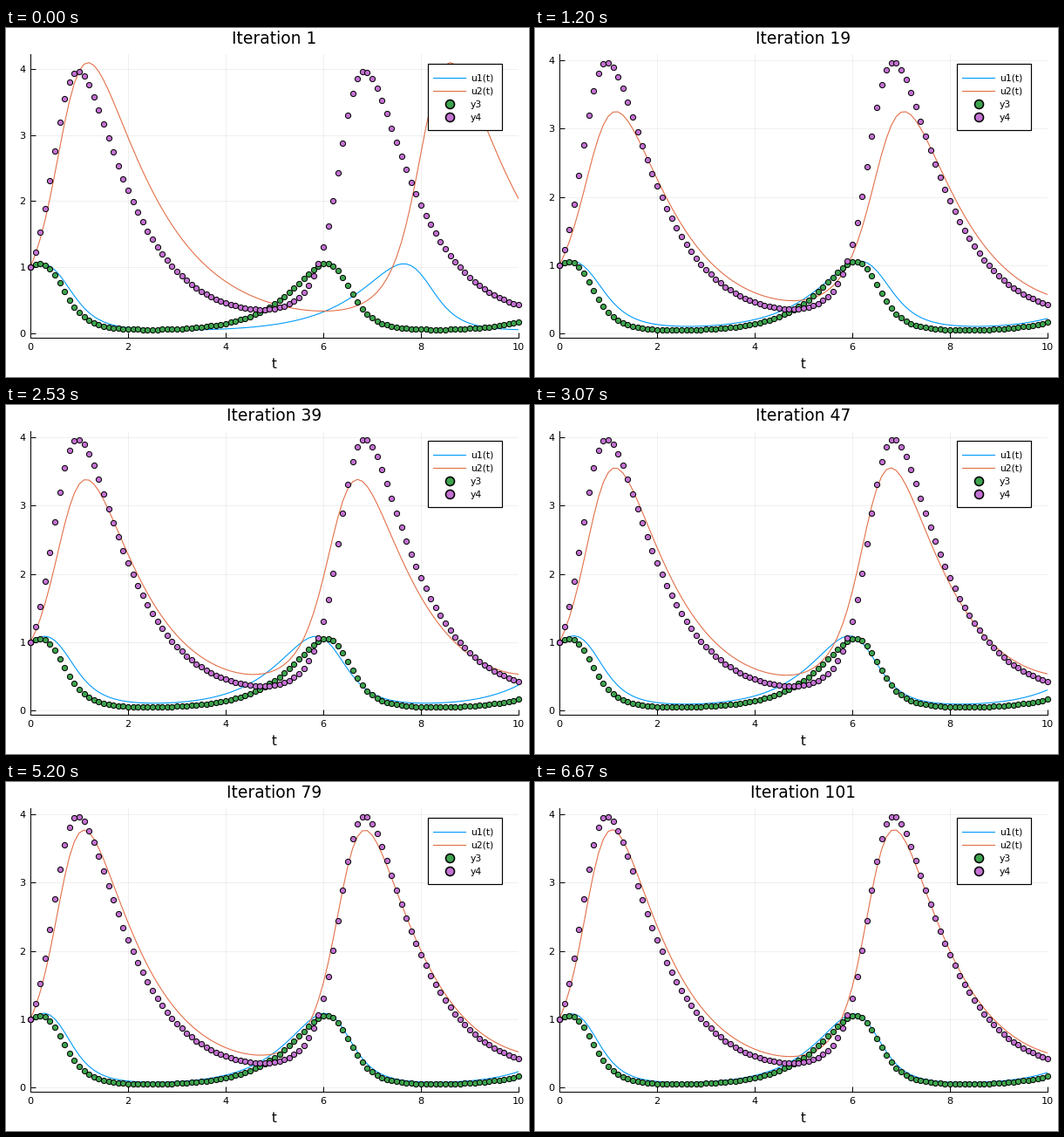
Recreate the animation shown at these times as a matplotlib script. Size 600 by 400 pixels, loop 6740 ms.

```python
import numpy as np
import matplotlib.pyplot as plt
from matplotlib.animation import FuncAnimation
from matplotlib.patches import Rectangle

W, H, DPI = 600, 400, 100
LOOP_MS, TICK_MS = 6740, 20
COUNT, RATE = 101, 15  # iterations, iterations per second
LEFT, RIGHT, TOP, BOTTOM = 28, 588, 30.4, 355.3
BLUE, ORANGE, GREEN, PURPLE = "#009afa", "#e36f47", "#3ea44e", "#c371d2"

T = np.linspace(0, 10, 101)
TRUE_PARAMS = (1.5, 1.0, 1.0, 3.0)

# Fitting progress: iteration, then prey growth, predation,
# predator decay and predator growth.
STAGES = np.array([
    (1, 1.200, 0.800, 0.800, 2.500),
    (19, 1.389, 0.959, 0.969, 2.346),
    (30, 1.475, 0.990, 1.012, 2.342),
    (47, 1.529, 0.971, 0.974, 2.387),
    (61, 1.511, 0.941, 0.954, 2.446),
    (79, 1.520, 0.957, 0.970, 2.534),
    (101, 1.511, 0.964, 0.974, 2.597),
])


def pt(px):
    return px * 72 / DPI


def hermite(x, knots, values):
    """Smooth curve through the knots, one column per parameter."""
    slopes = np.gradient(values, knots, axis=0)
    i = np.clip(np.searchsorted(knots, x, side="right") - 1, 0, len(knots) - 2)
    h = (knots[i + 1] - knots[i])[:, None]
    s = (x - knots[i])[:, None] / h
    return ((1 + 2 * s) * (1 - s) ** 2 * values[i]
            + s * (1 - s) ** 2 * h * slopes[i]
            + s * s * (3 - 2 * s) * values[i + 1]
            + s * s * (s - 1) * h * slopes[i + 1])


def lotka_volterra(params, substeps=6):
    """Runge-Kutta solution from (1, 1), sampled at T."""
    a, b, g, d = (np.asarray(p, float) for p in params)

    def rate(u):
        x, y = u
        return np.array([a * x - b * x * y, d * x * y - g * y])

    u = np.ones((2,) + a.shape)
    dt = (T[1] - T[0]) / substeps
    path = [u]
    for _ in T[1:]:
        for _ in range(substeps):
            k1 = rate(u)
            k2 = rate(u + dt / 2 * k1)
            k3 = rate(u + dt / 2 * k2)
            k4 = rate(u + dt * k3)
            u = u + dt / 6 * (k1 + 2 * k2 + 2 * k3 + k4)
        path.append(u)
    return np.moveaxis(np.array(path), 0, -1)


steps = np.arange(1, COUNT + 1, dtype=float)
fits = lotka_volterra(hermite(steps, STAGES[:, 0], STAGES[:, 1:]).T)
data = lotka_volterra(TRUE_PARAMS)

plt.rcParams["font.family"] = "DejaVu Sans"
fig = plt.figure(figsize=(W / DPI, H / DPI), dpi=DPI, facecolor="white")

ax = fig.add_axes([LEFT / W, 1 - BOTTOM / H,
                   (RIGHT - LEFT) / W, (BOTTOM - TOP) / H])
ax.set_xlim(0, 10)
ax.set_xticks(range(0, 11, 2))
ax.set_yticks(range(5))
ax.set_axisbelow(True)
ax.grid(color="black", alpha=0.06, linewidth=pt(1))
ax.spines[["top", "right"]].set_visible(False)
ax.spines[["left", "bottom"]].set_linewidth(pt(1))
ax.tick_params(direction="in", length=pt(6), width=pt(1),
               pad=pt(5.6), labelsize=pt(11.2))

curves = [ax.plot([], [], color=c, linewidth=pt(1.1), zorder=2.1)[0]
          for c in (BLUE, ORANGE)]
for values, color in zip(data, (GREEN, PURPLE)):
    ax.plot(T, values, "o", color=color, markersize=pt(6.2),
            markeredgecolor="black", markeredgewidth=pt(1),
            clip_on=False, snap=False, zorder=3)

# Overlay in pixel coordinates for the legend and labels.
top = fig.add_axes([0, 0, 1, 1], zorder=5)
top.set_xlim(0, W)
top.set_ylim(H, 0)
top.axis("off")
top.add_patch(Rectangle((483.5, 40.8), 85.7, 75.7, facecolor="white",
                        edgecolor="black", linewidth=pt(1.2)))
entries = (("u1(t)", BLUE), ("u2(t)", ORANGE), ("y3", GREEN), ("y4", PURPLE))
for row, (name, color) in enumerate(entries):
    y = 56.5 + 15 * row
    if row < 2:
        top.plot([490, 527], [y, y], color=color, linewidth=pt(1.1))
    else:
        top.plot([508.5], [y], "o", color=color, markersize=pt(10),
                 markeredgecolor="black", markeredgewidth=pt(1.6), snap=False)
    top.text(533, y + 4.3, name, fontsize=pt(10.7), va="baseline")
top.text(308, 389.5, "t", fontsize=pt(15), ha="center", va="baseline")
title = top.text(308, 18.4, "", fontsize=pt(18.8), ha="center", va="baseline")


def draw(tick):
    index = min(int((tick + 1) * TICK_MS * RATE / 1000), COUNT - 1)
    pair = fits[:, index]
    for curve, values in zip(curves, pair):
        curve.set_data(T, values)
    low = min(pair.min(), data.min())
    high = max(pair.max(), data.max())
    margin = 0.03 * (high - low)
    ax.set_ylim(low - margin, high + margin)
    title.set_text(f"Iteration {index + 1}")
    return [*curves, title]


anim = FuncAnimation(fig, draw, frames=LOOP_MS // TICK_MS, interval=TICK_MS,
                     init_func=lambda: draw(0), repeat=True, repeat_delay=0,
                     blit=False)
plt.show()
```
